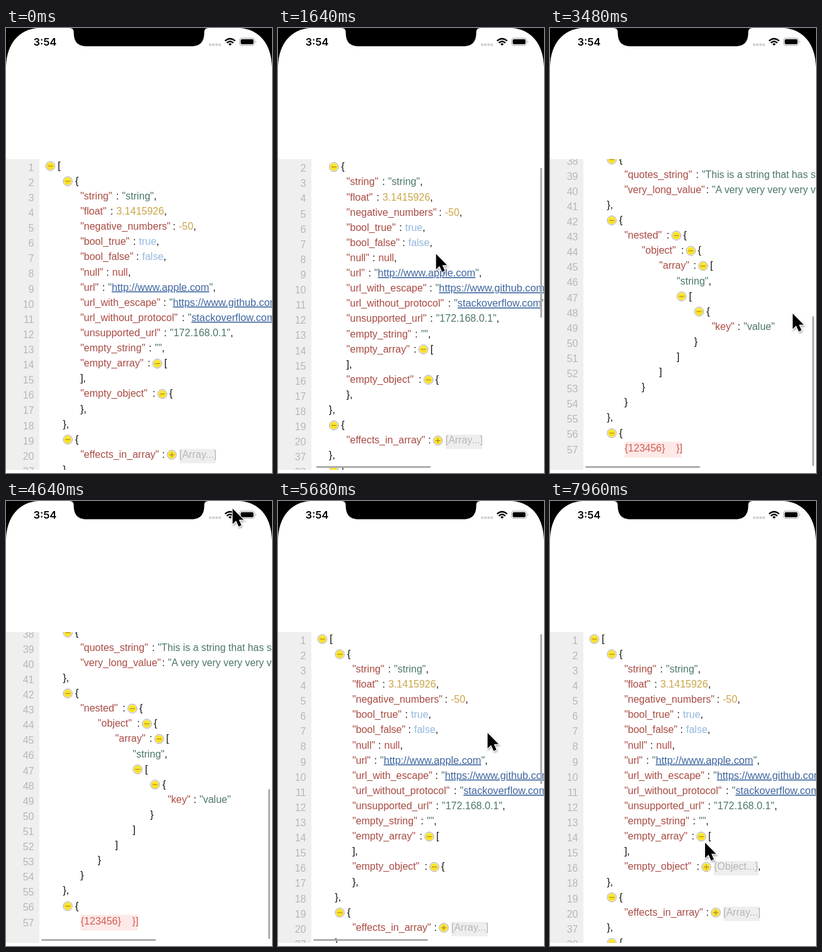
Write an HTML page that moves like this. It is 422 by 706 pixels and loops after 8 s.

```html
<!DOCTYPE html>
<html lang="en">
<head>
<meta charset="utf-8">
<title>JSON preview</title>
<style>
  html, body { margin: 0; width: 100%; height: 100%; overflow: hidden; background: #fff; }
  svg { display: block; width: 422px; height: 706px; }
  text { font: 16px "Liberation Sans", Arial, sans-serif; white-space: pre; fill: #111; }
  .key { fill: #a84b43; }
  .str { fill: #4b7767; }
  .prose { fill: #4b7767; font-size: 15.8px; }
  .num { fill: #caa548; }
  .bool { fill: #94b7de; }
  .null { fill: #b44a42; }
  .link { fill: #3f669f; font-size: 16.3px; text-decoration: underline; }
  .fold { fill: #b6b6b6; }
  .bad { fill: #d05c52; }
  .line { fill: #b7b7b7; text-anchor: end; }
  .clock { font: 600 16.5px Inter, sans-serif; fill: #000; }
  .bar { fill: #adadad; }
</style>
</head>
<body>
<svg viewBox="0 0 422 706">
  <defs>
    <clipPath id="pane"><rect x="53" y="208" width="369" height="493"/></clipPath>
    <clipPath id="side"><rect y="208" width="53" height="493"/></clipPath>
    <radialGradient id="gold" cy=".4"><stop stop-color="#ffec35"/><stop offset="1" stop-color="#fadc1c"/></radialGradient>
    <filter id="shade" x="-50%" y="-50%" width="200%" height="200%">
      <feDropShadow dx="1" dy="2" stdDeviation="1.5" flood-opacity=".35"/>
    </filter>
  </defs>
  <rect width="422" height="706" fill="#fff"/>
  <rect y="208" width="53" height="493" fill="#efefef"/>
  <g clip-path="url(#side)"><g id="gutter"></g></g>
  <g clip-path="url(#pane)"><g id="content"></g></g>
  <g id="bars">
    <rect id="vbar" class="bar" x="416" width="3" height="238" rx="1.5"/>
    <rect id="hbar" class="bar" y="695" width="182" height="3" rx="1.5"/>
  </g>
  <path d="M0 0H51C22 2 1 23 0 62ZM422 0H371C400 2 421 23 422 62Z"/>
  <path d="M101 0Q107.500 0 107.500 7C107.500 22 114 29 129 29H293C308 29 314.500 22 314.500 7Q314.500 0 321 0Z"/>
  <text class="clock" x="43.500" y="28">3:54</text>
  <g fill="#d2d2d2">
    <circle cx="324" cy="26.500" r="2.200"/><circle cx="329" cy="26.500" r="2.200"/>
    <circle cx="334" cy="26.500" r="2.200"/><circle cx="339" cy="26.500" r="2.200"/>
  </g>
  <g fill="none" stroke="#000" stroke-width="2.300">
    <path d="M347.500 20.500Q355.500 13.500 363.500 20.500M350.300 23.600Q355.500 19 360.700 23.600"/>
    <path d="M355.500 28L352.800 25.300Q355.500 23.200 358.200 25.300Z" fill="#000" stroke="none"/>
  </g>
  <rect x="370.500" y="16" width="24" height="11.500" rx="3.500" fill="none" stroke="#a5a5a5"/>
  <rect x="372.300" y="17.800" width="20.400" height="8" rx="2"/>
  <path d="M396 20Q398 21.700 396 23.500Z" fill="#a5a5a5"/>
  <g id="cursor" filter="url(#shade)">
    <path d="M0 1V25.500L5.500 20.300L9.700 29.500L14 27.600L10 18.700H17.500Z" stroke="#fff" stroke-width="2" paint-order="stroke"/>
  </g>
</svg>
<script>
const $ = id => document.getElementById(id);
const FIRST = 219, STEP = 24.11, LOOP = 8000, FOLD_AT = 6980;
const MAX_X = 359, MAX_Y = 516.5;
const left = level => 63 + 27.7 * level;

const span = (cls, text, x) =>
  `<tspan class="${cls}"${x === undefined ? '' : ` x="${x}"`}>${text}</tspan>`;
const label = body => `<text y="4.800">${body}</text>`;
const plain = (text, x) => label(span('', text, x));

function toggle(x, plus) {
  return `<circle cx="${x}" r="7.200" fill="#fff" stroke="#979797" stroke-width=".9"/>
    <circle cx="${x}" r="6" fill="url(#gold)"/>
    <path d="M${x - 3.8} 0h7.600${plus ? `M${x} -3.800v7.600` : ''}" stroke="#94772a"/>`;
}

const key = (level, name, valueX) =>
  label(span('key', `"${name}"`, left(level) - 0.5) + span('', ':', valueX - 9.5));

// One "key : value" row.
function pair(level, name, x, cls, value, tail = ',') {
  const body = cls === 'link'
    ? span('str', '"', x) + span('link', value) + span('str', '"')
    : span(cls, value, x);
  return key(level, name, x) + label(body + span('', tail));
}

const open = (level, mark) =>
  toggle(left(level) + 7.3) + plain(mark, left(level) + 19);
const close = (level, mark) => plain(mark, left(level) - 0.5);
const openPair = (level, name, x, mark) =>
  key(level, name, x - 6) + toggle(x) + plain(mark, x + 11);
const folded = (level, name, x, text, width, tail = '') =>
  key(level, name, x - 6) + toggle(x, true) +
  `<rect x="${x + 12}" y="-9.500" width="${width}" height="23" fill="#eee"/>` +
  label(span('fold', text, x + 12) + span('', tail, x + 12 + width - 1));

const head = [
  open(0, '['),
  open(1, '{'),
  pair(2, 'string', 184, 'str', '"string"'),
  pair(2, 'float', 175, 'num', '3.1415926'),
  pair(2, 'negative_numbers', 274, 'num', '-50'),
  pair(2, 'bool_true', 211, 'bool', 'true'),
  pair(2, 'bool_false', 216, 'bool', 'false'),
  pair(2, 'null', 168.5, 'null', 'null'),
  pair(2, 'url', 162, 'link', 'http://www.apple.com'),
  pair(2, 'url_with_escape', 259, 'link', 'https://www.github.com'),
  pair(2, 'url_without_protocol', 288.5, 'link', 'stackoverflow.com'),
  pair(2, 'unsupported_url', 260, 'str', '"172.168.0.1"'),
  pair(2, 'empty_string', 236, 'str', '""'),
  openPair(2, 'empty_array', 240, '['),
  close(2, '],'),
  `<g id="objOpen">${openPair(2, 'empty_object', 248, '{')}</g>
   <g id="objFolded">${folded(2, 'empty_object', 248, '{Object...}', 71, ',')}</g>`,
  close(2, '},'),
  close(1, '},'),
  open(1, '{'),
  folded(2, 'effects_in_array', 263, '[Array...]', 58)
];
const tail = [
  close(1, '},'),
  open(1, '{'),
  pair(2, 'quotes_string', 241, 'prose', '"This is a string that has some \\"quotes\\" inside it!"'),
  pair(2, 'very_long_value', 257, 'prose', `"A ${'very '.repeat(12)}long string."`, ''),
  close(1, '},'),
  open(1, '{'),
  openPair(2, 'nested', 200.5, '{'),
  openPair(3, 'object', 223.5, '{'),
  openPair(4, 'array', 243, '['),
  label(span('str', '"string"', left(5) - 0.5) + span('', ',')),
  open(5, '['),
  open(6, '{'),
  pair(7, 'key', 307, 'str', '"value"', ''),
  close(6, '}'), close(5, ']'), close(4, ']'), close(3, '}'), close(2, '}'), close(1, '},'),
  open(1, '{'),
  `<rect x="118.500" y="-10.500" width="90" height="25" fill="#fde9e7"/>` +
    label(span('bad', '{123456}    }]', 118.5))
];

const rows = [...head.map((body, i) => [i + 1, body]), ...tail.map((body, i) => [i + 37, body])];
$('content').innerHTML = rows.map(([, body]) => `<g>${body}</g>`).join('');
$('gutter').innerHTML = rows.map(([n]) => `<text class="line" x="44.500" y="7.700">${n}</text>`).join('');
const bodies = [...$('content').children], numbers = [...$('gutter').children];

let isFolded = null;
function layout(fold) {
  if (fold === isFolded) return;
  isFolded = fold;
  $('objOpen').style.display = fold ? 'none' : '';
  $('objFolded').style.display = fold ? '' : 'none';
  let y = FIRST;
  rows.forEach(([n], i) => {
    const hidden = fold && n === 17;
    for (const el of [bodies[i], numbers[i]]) {
      el.style.display = hidden ? 'none' : '';
      el.setAttribute('transform', `translate(0 ${y})`);
    }
    if (!hidden) y += STEP;
  });
}

const linear = p => p;
const smooth = p => p * p * (3 - 2 * p);
const easeOut = p => 1 - (1 - p) ** 3;
const easeIn = p => p * p;
const easeBoth = p => p < 0.5 ? 4 * p ** 3 : 1 - 4 * (1 - p) ** 3;

// Keys are [time, x, y, easing into this key].
function track(keys, t) {
  const i = keys.findIndex(k => k[0] > t);
  if (i === 0) return keys[0].slice(1, 3);
  if (i < 0) return keys[keys.length - 1].slice(1, 3);
  const a = keys[i - 1], b = keys[i];
  const p = (b[3] || smooth)((t - a[0]) / (b[0] - a[0]));
  return [a[1] + (b[1] - a[1]) * p, a[2] + (b[2] - a[2]) * p];
}

const scrollKeys = [
  [1540, 0, 0], [1640, 9, 22, easeIn], [1800, 60, 110, linear],
  [2450, MAX_X, MAX_Y, easeOut], [2640, MAX_X, MAX_Y],
  [2760, 300, MAX_Y, easeIn], [3380, 0, MAX_Y, easeOut],
  [4640, 0, MAX_Y], [5006, 0, 0, easeBoth]
];
const cursorKeys = [
  [300, 424, 500], [1000, 260, 380, easeOut], [1540, 260, 380],
  [1640, 251, 358, easeIn], [1820, 200, 265, linear], [2350, 232, 448],
  [2640, 232, 448], [2900, 385, 452], [3500, 385, 452], [4200, 359.5, 11],
  [5060, 359.5, 11], [5620, 332.5, 367], [6200, 332.5, 367],
  [6850, 251, 585], [7200, 251, 585], [7800, 246, 541]
];

const move = (el, x, y) => el.setAttribute('transform', `translate(${x} ${y})`);
const ramp = (t, from, to) => Math.min(1, Math.max(0, (t - from) / (to - from)));

function draw(now) {
  const t = now % LOOP;
  layout(t >= FOLD_AT);
  const [x, y] = track(scrollKeys, t);
  move($('content'), -x, -y);
  move($('gutter'), 0, -y);
  $('vbar').setAttribute('y', 211 + 246 * y / MAX_Y);
  $('hbar').setAttribute('x', 56 + 174 * x / MAX_X);
  $('bars').setAttribute('opacity', ramp(t, 1540, 1600) * (1 - ramp(t, 5950, 6250)));
  move($('cursor'), ...track(cursorKeys, t));
  $('cursor').style.display = t < 300 ? 'none' : '';
}

const start = performance.now();
function frame() {
  draw(performance.now() - start);
  requestAnimationFrame(frame);
}
frame();
</script>
</body>
</html>
```
